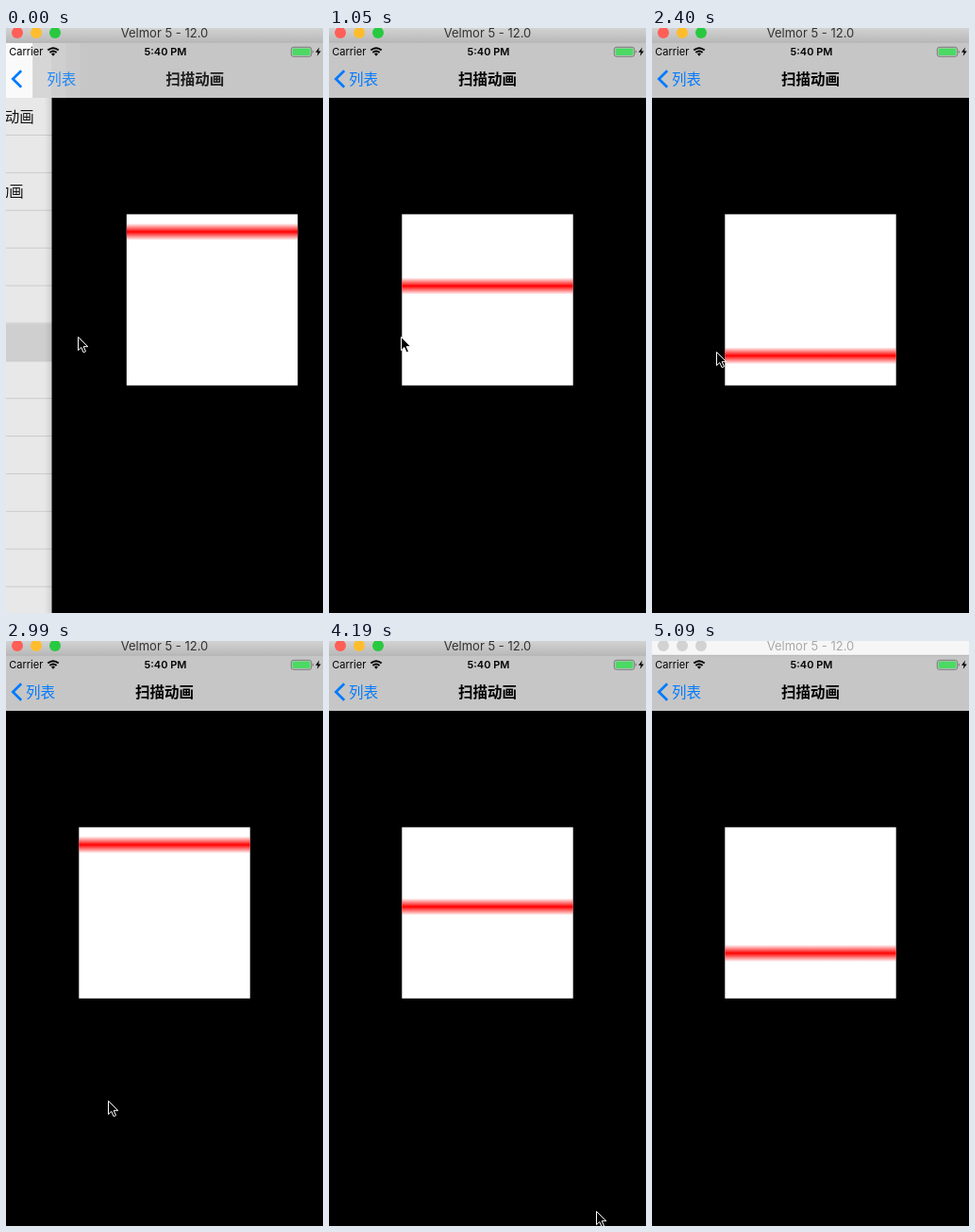
These frames come from a looping animation (336 px wide and 620 px high, 5190 ms). An HTML page:

```html
<!DOCTYPE html>
<html lang="zh">
<head>
<meta charset="utf-8">
<style>
html, body { margin: 0; width: 100%; height: 100%; overflow: hidden; background: #000; }
svg { display: block; font-family: Inter, Roboto, sans-serif; }
.zh { font: 15.5px "Noto Sans CJK SC", "Noto Sans CJK", sans-serif; }
</style>
</head>
<body>
<svg width="336" height="620" viewBox="0 0 336 620">
  <defs>
    <linearGradient id="beam" x2="0" y2="1">
      <stop stop-color="#f00" stop-opacity="0"/>
      <stop offset=".5" stop-color="#f00"/>
      <stop offset="1" stop-color="#f00" stop-opacity="0"/>
    </linearGradient>
    <linearGradient id="chrome" x2="0" y2="1">
      <stop stop-color="#d2d2d2"/><stop offset="1" stop-color="#b9b9b9"/>
    </linearGradient>
    <linearGradient id="shade">
      <stop stop-color="#000" stop-opacity="0"/><stop offset="1" stop-color="#000" stop-opacity=".1"/>
    </linearGradient>
  </defs>

  <g id="list">
    <rect x="-20" y="74" width="120" height="546" fill="#e8e8e8"/>
    <rect x="-20" y="313.5" width="120" height="40" fill="#cfcfcf"/>
    <g id="rows" stroke="#cbcbcb"></g>
    <g class="zh" text-anchor="end" fill="#111">
      <text x="29.5" y="99.5">动画</text>
      <text x="18.5" y="179.3">动画</text>
    </g>
  </g>

  <g id="page">
    <rect x="-10" y="74" width="8" height="546" fill="url(#shade)"/>
    <rect x="-2" y="74" width="340" height="546"/>
    <rect x="77.3" y="197.4" width="181.4" height="181.4" fill="#fff"/>
    <rect id="line" x="77.3" width="181.4" height="18" fill="url(#beam)"/>
  </g>

  <rect y="15" width="336" height="59" fill="#c6c6c6"/>
  <g id="glow">
    <rect x="-40" y="16" width="68" height="58" fill="#fafafa"/>
    <rect x="28" y="16" width="20" height="58" fill="#d6d6d6"/>
    <rect x="48" y="16" width="15" height="58" fill="#cfcfcf"/>
    <rect x="63" y="16" width="15" height="58" fill="#cacaca"/>
  </g>
  <path d="M16.2 45.3 7.3 54l8.9 8.7" fill="none" stroke="#007aff" stroke-width="2.7"/>
  <text id="back" class="zh" x="21" y="59.8" fill="#007aff">列表</text>
  <text id="title" class="zh" x="168" y="59.8" text-anchor="middle" style="font-weight:700">扫描动画</text>

  <g font-size="11">
    <text x="3.3" y="29">Carrier</text>
    <text x="169" y="29" text-anchor="middle" font-weight="600">5:40 PM</text>
  </g>
  <g fill="none" stroke="#000" stroke-width="2">
    <path d="M44.3 23.6q5.7-4.7 11.4 0M46.4 26q3.6-2.9 7.2 0"/>
    <path d="M48 27.4q2-1.6 4 0l-2 2.3z" fill="#000" stroke="none"/>
  </g>
  <rect x="302.3" y="20.3" width="21.4" height="10" rx="2.4" fill="none" stroke="#666" stroke-width=".8"/>
  <rect x="303.6" y="21.6" width="18.8" height="7.4" rx="1.2" fill="#4cd964"/>
  <path d="M324.8 23.6q2 1.7 0 3.4z" fill="#666"/>
  <path d="M332 20.5l-4 5.3h2.6l-.9 4 4.1-5.4h-2.6z"/>

  <rect id="bar" width="336" height="15"/>
  <path d="M0 15.2h336" stroke="#a8a8a8" stroke-width=".6"/>
  <g id="lights"><circle cx="12" cy="5" r="6"/><circle cx="32" cy="5" r="6"/><circle cx="52" cy="5" r="6"/></g>
  <text id="name" x="168" y="10.3" font-size="13" text-anchor="middle">Velmor 5 - 12.0</text>

  <path id="cursor" d="M.5.5v14.2l3.3-3.1 2.3 5.2 2.4-1-2.3-5.1h4.6z" stroke="#fff"/>
</svg>
<script>
const $ = id => document.getElementById(id);
const move = (id, x, y = 0) => $(id).setAttribute('transform', `translate(${x} ${y})`);
const LOOP = 5190, SWEEP = 2990;
const lights = ['#ff5f57', '#ffbd2e', '#28c940'];

// [time, x, y] of the pointer tip
const path = [[0, 76, 327], [2250, 76, 327], [2400, 68, 343], [2550, 46, 392], [2700, 41, 440],
  [2840, 78, 474], [2990, 108, 487], [3440, 108, 487], [3740, 150, 520], [4190, 283, 604]];

for (let i = 0; i < 13; i++)
  $('rows').innerHTML += `<path d="M-20 ${113.5 + i * 39.88}h120"/>`;

function pointer(t) {
  const i = path.findIndex(p => p[0] > t);
  if (i < 0) return path[path.length - 1].slice(1);
  const [a, b] = [path[i - 1], path[i]], k = (t - a[0]) / (b[0] - a[0]);
  return [1, 2].map(j => a[j] + (b[j] - a[j]) * k);
}

const snap = t => t < 2840 ? Math.floor(t / 150) * 150 : 2840 + Math.floor((t - 2840) / 150) * 150;

function draw(t) {
  // tail of a critically damped push
  const w = 3.37 + t * .013;
  const off = t < 450 ? 336 * (1 + w) * Math.exp(-w) : 0;
  const k = off / 50;
  move('page', off);
  move('list', .3 * (off - 50));
  move('glow', off - 50);
  $('glow').style.display = $('list').style.display = off ? '' : 'none';
  move('back', 22 * k);
  move('title', 32 * k);
  $('back').style.opacity = $('title').style.opacity = 1 - .15 * k;

  $('line').setAttribute('y', 197 + .0547 * ((t + 183) % SWEEP));

  const active = t < 4790;
  $('bar').setAttribute('fill', active ? 'url(#chrome)' : '#f6f6f6');
  $('name').setAttribute('fill', active ? '#333' : '#a9a9a9');
  [...$('lights').children].forEach((c, i) => c.setAttribute('fill', active ? lights[i] : '#d2d2d2'));

  $('cursor').style.display = t < 4340 ? '' : 'none';
  move('cursor', ...pointer(t));
}

const start = performance.now();
function tick() {
  draw(snap((performance.now() - start) % LOOP));
  requestAnimationFrame(tick);
}
tick();
</script>
</body>
</html>
```
